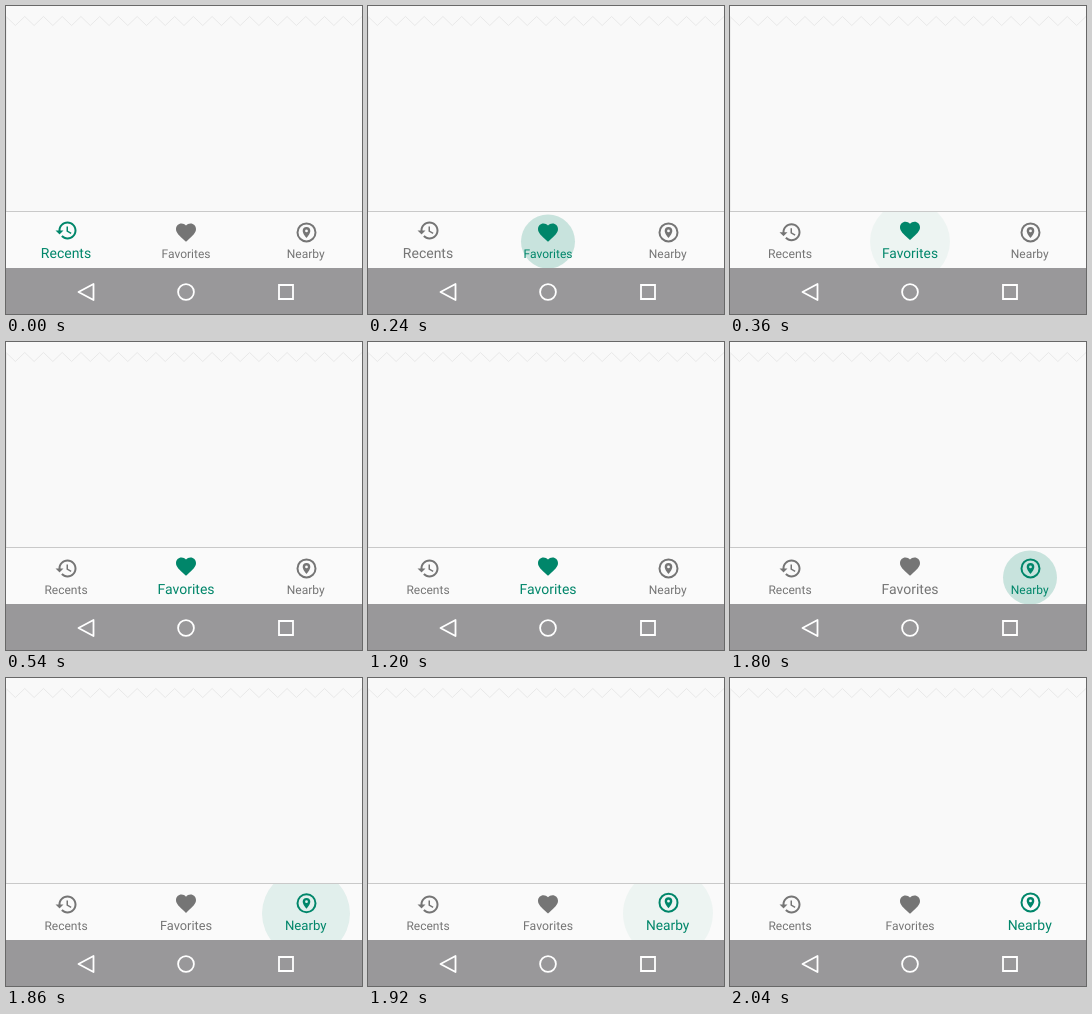
These frames come from a looping animation (356 px wide and 308 px high, 2.4 s). An HTML page:

```html
<!DOCTYPE html>
<html lang="en">
<head>
<meta charset="utf-8">
<title>Bottom navigation</title>
<style>
  html, body { margin: 0; width: 100%; height: 100%; overflow: hidden; background: #f9f9f9; }
  svg { display: block; }
  text { font-family: Roboto, sans-serif; text-anchor: middle; text-rendering: geometricPrecision; }
</style>
</head>
<body>
<svg width="356" height="308" viewBox="0 0 356 308">
  <defs><clipPath id="bar"><path d="M0 206H356V262H0z"/></clipPath></defs>
  <path id="tear" fill="none" stroke="#e9e9e9"/>
  <path d="M.5 11V205" stroke="#eee"/>
  <path fill="#fafafa" d="M0 206H356V262H0z"/>
  <path d="M0 205.5H356" stroke="#c9c9c9"/>
  <circle id="ripple" cy="235.5" fill="#00866a" clip-path="url(#bar)"/>

  <g class="tab">
    <path d="M13 3c-4.97 0-9 4.03-9 9H1l3.89 3.89.07.14L9 12H6c0-3.87 3.13-7 7-7s7 3.13 7 7-3.13 7-7 7c-1.93 0-3.68-.79-4.94-2.06l-1.42 1.42C8.27 19.99 10.51 21 13 21c4.97 0 9-4.03 9-9s-4.03-9-9-9zm-1 5v5l4.28 2.54.72-1.21-3.5-2.08V8H12z"/>
    <text x="60" y="252">Recents</text>
  </g>
  <g class="tab">
    <path d="M12 21.35l-1.45-1.32C5.4 15.36 2 12.28 2 8.5 2 5.42 4.42 3 7.5 3c1.74 0 3.41.81 4.5 2.09C13.09 3.81 14.76 3 16.5 3 19.58 3 22 5.42 22 8.5c0 3.78-3.4 6.86-8.55 11.54L12 21.35z"/>
    <text x="180" y="252">Favorites</text>
  </g>
  <g class="tab">
    <path fill-rule="evenodd" d="M12 2a10 10 0 1 0 0 20a10 10 0 1 0 0-20zm0 2a8 8 0 1 1 0 16a8 8 0 1 1 0-16zm0 2.7a3.8 3.8 0 0 0-3.8 3.8c0 2.8 3.8 7 3.8 7s3.8-4.2 3.8-7A3.8 3.8 0 0 0 12 6.7zm0 2.4a1.4 1.4 0 1 1 0 2.8a1.4 1.4 0 1 1 0-2.8z"/>
    <text x="299.7" y="252">Nearby</text>
  </g>

  <path fill="#99989a" d="M0 262H356V308H0z"/>
  <g fill="none" stroke="#fff" stroke-width="1.8" stroke-linejoin="round">
    <path d="M72.5 286L87.5 278V294z"/>
    <circle cx="180" cy="286" r="7.9"/>
    <path stroke-linejoin="miter" d="M273 279H287V293H273z"/>
  </g>
</svg>
<script>
const LOOP = 2400, STEP = 60, GROW = 300;
const GREEN = '#00866a', GREY = '#757575';
const iconX = [48.5, 168, 288.5];
// Each tap: selected tab, time of selection, first visible ripple, ripple limits
const taps = [
  { tab: 1, at: 240, from: 240, cx: 180, max: 40 },
  { tab: 2, at: 1800, from: 1740, cx: 300, max: 45 }
];
const tabs = [...document.querySelectorAll('.tab')];
const ripple = document.getElementById('ripple');

const set = (el, attrs) => {
  for (const name in attrs) el.setAttribute(name, attrs[name]);
};

let zigzag = 'M0 10.5';
for (let i = 1; i <= 38; i++) zigzag += `L${(i * 356 / 38).toFixed(2)} ${i % 2 ? 19.5 : 10.5}`;
set(document.getElementById('tear'), { d: zigzag });

function drawRipple(t) {
  const tap = taps.find(p => t >= p.from && t < p.at + 240);
  if (!tap) return set(ripple, { opacity: 0 });
  const n = (t - tap.at) / STEP + 1;
  set(ripple, {
    cx: tap.cx,
    r: Math.min(10 + 17 * n, tap.max),
    opacity: n < 1 ? 0.1 + 0.1 * n : 0.2 * 0.5 ** (n - 1)
  });
}

function draw(t) {
  const tap = taps.findLast(p => t >= p.at);
  const active = tap ? tap.tab : 0;
  const k = tap ? Math.min(1, (t - tap.at) / GROW) : 1;
  const eased = 1 - (1 - k) ** 4;
  tabs.forEach((tab, i) => {
    const size = i === active ? eased : i === active - 1 ? 1 - eased : 0;
    set(tab, { fill: i === active ? GREEN : GREY });
    set(tab.children[0], { transform: `translate(${iconX[i]} ${214.4 - 2 * size})` });
    set(tab.children[1], { 'font-size': 12 + 2 * size });
  });
  drawRipple(t);
}

const start = performance.now();
function tick() {
  const t = (performance.now() - start) % LOOP;
  draw(Math.floor(t / STEP) * STEP);
  requestAnimationFrame(tick);
}
tick();
</script>
</body>
</html>
```
